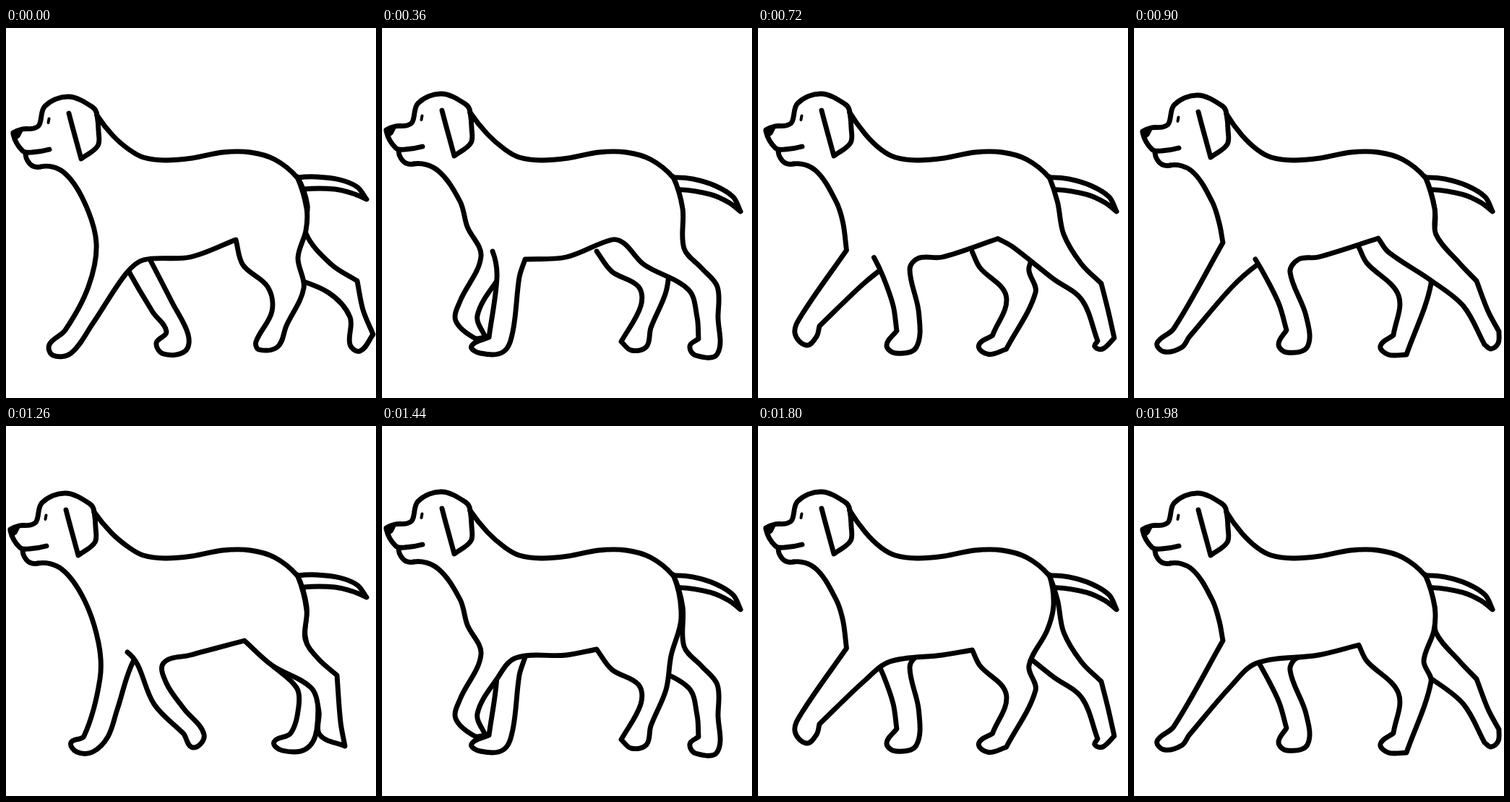
Write an HTML page that moves like this. It is 512 px wide and 512 px high and loops after 2.16 s.

```html
<!DOCTYPE html>
<html lang="en">
<head>
<meta charset="utf-8">
<title>Walking dog</title>
<style>
  html, body { margin: 0; width: 100%; height: 100%; overflow: hidden; background: #fff; }
  svg { display: block; width: 100%; height: 100%; }
  path { fill: none; stroke: #000; stroke-width: 6.9; stroke-linecap: round; stroke-linejoin: round; }
  .solid { fill: #fff; }
  .eye { stroke-width: 4; }
  .nose { fill: #000; stroke-width: 3; }
  .pose { visibility: hidden; animation: show 2160ms step-end calc((var(--i) - 12) * 180ms) infinite; }
  @keyframes show {
    0% { visibility: visible; }
    8.333333%, 100% { visibility: hidden; }
  }
</style>
</head>
<body>
<svg id="stage" viewBox="0 0 512 512"></svg>
<script>
// "x,y" is a smooth point; "x,y!" is a corner, stored as a doubled point.
const pts = text => text.split(' ').flatMap(p => {
  const xy = p.replace('!', '').split(',').map(Number);
  return p.endsWith('!') ? [xy, xy] : [xy];
});

// Each leg runs down its left edge, round the paw and up its right edge.
const pose = (head, ...legs) => {
  const [frontL, frontR, hindL, hindR] = legs.map(pts);
  return { head, front: [frontL, frontR], hind: [hindL, hindR] };
};

const reach = pose([0, 0],
  '125,298 114,358 82,418 60,438 65,453 90,450 120,409 166,340 190,321',
  '166,330 203,393 222,420 208,436 218,451 248,447 252,424 230,380 198,318',
  '318,293! 328,328 362,358 368,392 346,434 350,445 376,441 388,412 412,360 404,318 415,280 416,250',
  '334,292! 378,336 446,366 476,400 476,438 490,447 508,424! 494,390 486,350! 450,327 415,284 417,245');
const push = pose([-4, -2],
  '128,300 130,350 108,429 90,438 98,451 120,451 141,430 154,392 178,322 195,319',
  '168,313 182,330 205,385 246,426! 259,445 274,427 246,391 222,356 218,328',
  '330,297! 368,331 402,362 405,388 394,425 371,437 382,449 415,447 430,420 429,350 414,290 416,250',
  '330,297! 368,331 422,362 433,395 434,427 469,443! 463,410 458,345! 432,322 414,295 416,255');
const pass = pose([-4, -4],
  '118,275 137,316 108,378 102,405 128,429 143,428! 132,398 159,350 185,321',
  '153,309 159,345 148,428! 124,440 136,450 168,448 181,420 190,345 198,320!',
  '297,309! 318,337 355,358 358,385 331,434! 345,446 366,441 372,415 393,365 400,318 414,265',
  '318,293 335,298 362,327 424,362 436,400 438,430! 426,440 434,453 464,451 465,400 464,358 442,332 418,305 416,250');
const lift = pose([0, -6],
  '117,268 122,318! 66,378 70,408 92,430 96,412 94,397! 160,346 195,324',
  '153,315 163,342 173,385 173,420! 156,440 170,451 198,443 207,390 204,330 216,317',
  '282,317! 292,338 321,373 290,426! 270,439 286,451 310,437! 357,378 349,338 385,283 402,245',
  '326,292! 352,295 405,344 440,367 455,428! 438,438 450,452 481,438! 479,390 476,357! 445,328 428,285 413,232');
const land = pose([2, -2],
  '118,270 123,297! 55,416 32,436 42,448 66,442 76,428! 135,359 170,328',
  '168,320 184,348 201,383 211,418! 200,438 212,449 240,441 238,398 216,338 228,320',
  '311,303! 322,325 366,370 359,425! 341,440 352,452 377,452! 411,354 401,325 415,283 416,250',
  '338,291! 352,310 412,350 456,385 485,438! 494,444 504,436 505,420! 490,392 474,350! 450,325 418,286 416,250');

const mix = (a, b) => Array.isArray(a) ? a.map((v, k) => mix(v, b[k])) : (a + b) / 2;
const between = (a, b) => Object.fromEntries(Object.keys(a).map(k => [k, mix(a[k], b[k])]));
const poses = [reach, push, pass, lift, between(lift, land), land];

const diff = (a, b) => [a[0] - b[0], a[1] - b[1]];
const unit = ([x, y]) => { const l = Math.hypot(x, y) || 1; return [x / l, y / l]; };

// End direction that bends the outer segment like an arc.
function mirror(dir, chord) {
  const c = unit(chord), k = 2 * (c[0] * dir[0] + c[1] * dir[1]);
  return [k * c[0] - dir[0], k * c[1] - dir[1]];
}

function curve(line, cls = '') {
  const n = line.length - 1;
  const dirs = line.map((p, i) => unit(diff(line[Math.min(i + 1, n)], line[Math.max(i - 1, 0)])));
  if (n > 1) {
    dirs[0] = mirror(dirs[1], diff(line[1], line[0]));
    dirs[n] = mirror(dirs[n - 1], diff(line[n], line[n - 1]));
  }
  let d = 'M' + line[0];
  for (let i = 0; i < n; i++) {
    const a = line[i], b = line[i + 1], h = Math.hypot(...diff(b, a)) / 3;
    const p = a.map((v, k) => v + dirs[i][k] * h);
    const q = b.map((v, k) => v - dirs[i + 1][k] * h);
    d += `C${p} ${q} ${b}`;
  }
  return `<path class="${cls}" d="${d}"/>`;
}

// The first points follow the head, less and less.
const follow = (text, [dx, dy]) => pts(text).map(([x, y], i) => {
  const k = Math.max(0, 1 - i / 2);
  return [x + dx * k, y + dy * k];
});

const droop = (line, sag) => line.map(([x, y]) =>
  [x - sag / 6 * (x > 490), y + sag * Math.max(0, (x - 404) / 95) ** 1.35]);

const rump = [[403, 206]], belly = [[255, 317]];
const tail = pts('404,207 430,206 462,210 486,220 499,237! 480,229 455,223 412,223');
const face = [
  '10,145 22,140 38,139 46,134 54,108 86,95 119,109 126,121',
  '10,147 23,170 36,172 60,168',
  '27,175 30,184 37,191 48,192',
  '87,118 92,137 104,181! 127,163 128,142 126,121',
].map(line => curve(pts(line))).join('') +
  '<path class="eye" d="M59.5 125.5L58.5 131"/>' +
  '<path class="nose" d="M9 144L23 140L18 150L13 154Z"/>';

// In the second half of the walk the other pair of legs is in front.
function dog({ head, front, hind }, near, sag) {
  const far = 1 - near;
  const chest = follow('48,192 79,199 108,240', head);
  const fore = [[...chest, ...front[0]], front[1]];
  const rear = hind.map(leg => [...leg, ...rump]);
  return curve(fore[far], 'solid') + curve(rear[far], 'solid') +
    curve([...fore[near], ...belly, ...rear[near]], 'solid') +
    curve(droop(tail, sag)) +
    curve(follow('126,121 148,149 170,168 190,179 220,183 258,180 300,172 338,172 372,182 403,207', head)) +
    `<g transform="translate(${head})">${face}</g>`;
}

// Which leg leads: the left one (0) while it carries weight, as drawn per step.
const leads = i => {
  const early = i % 6 < 2;
  return i < 6 ? +!early : +early;
};

document.getElementById('stage').innerHTML = Array.from({ length: 12 }, (_, i) =>
  `<g class="pose" style="--i:${i}">${dog(poses[i % 6], leads(i), i % 6 < 2 ? 0 : 17)}</g>`).join('');
</script>
</body>
</html>
```
